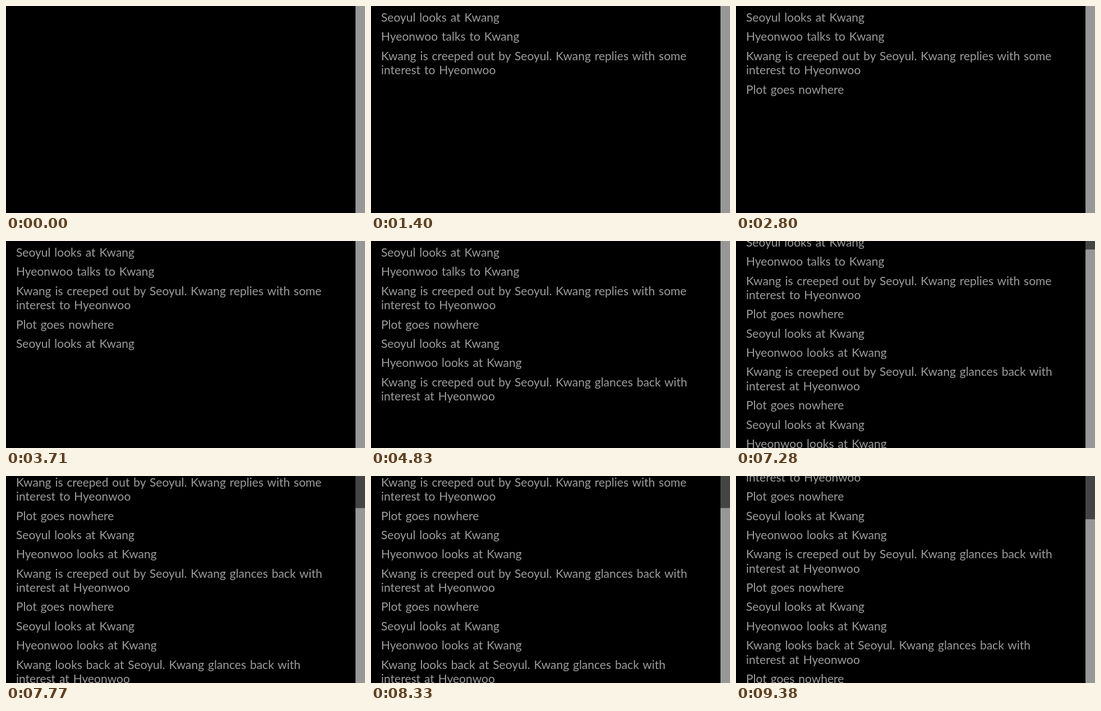
An HTML page that plays this animation: 640 by 370 pixels, repeating every 9660 ms.

```html
<!DOCTYPE html>
<html lang="en">
<head>
<meta charset="utf-8">
<style>
  html, body { margin: 0; width: 100%; height: 100%; overflow: hidden; background: #000; }
  svg { display: block; width: 640px; height: 370px; }
  text { font: 21px Lato, "Open Sans", sans-serif; word-spacing: 1.5px; fill: #9c9c9c; }
</style>
</head>
<body>
<svg viewBox="0 0 640 370">
  <rect width="640" height="370"/>
  <g id="page"></g>
  <rect x="623" width="17" height="370" fill="#444"/>
  <rect id="thumb" x="623" width="17" height="370" fill="#979797"/>
</svg>
<script>
const LOOP = 9660, VIEW = 370, ROW = 34.4, WRAP = 25.3, PAD = 55;
const [A, B, C] = ["Seoyul", "Kwang", "Hyeonwoo"];
const glance = `${A} looks at ${B}`;
const nowhere = "Plot goes nowhere";
const script = [
  [350, glance],
  [840, `${C} talks to ${B}`],
  [1400, `${B} is creeped out by ${A}. ${B} replies with some`, `interest to ${C}`],
  [2800, nowhere],
  [3710, glance],
  [4410, `${C} looks at ${B}`],
  [4830, `${B} is creeped out by ${A}. ${B} glances back with`, `interest at ${C}`],
  [5810, nowhere],
  [6720, glance],
  [7280, `${C} looks at ${B}`],
  [7770, `${B} looks back at ${A}. ${B} glances back with`, `interest at ${C}`],
  [8820, nowhere]
];

const page = document.getElementById("page");
const thumb = document.getElementById("thumb");

function addLine(text, y) {
  const el = document.createElementNS("http://www.w3.org/2000/svg", "text");
  el.setAttribute("x", 18);
  el.setAttribute("y", y);
  el.textContent = text;
  page.append(el);
  return el;
}

let y = 28;
const entries = script.map(([time, ...lines]) => {
  const els = lines.map((line, i) => addLine(line, y + i * WRAP));
  const bottom = y + (lines.length - 1) * WRAP;
  y = bottom + ROW;
  return { time, els, bottom };
});

function draw(now) {
  const t = now % LOOP;
  let bottom = 0;
  for (const e of entries) {
    const shown = t >= e.time;
    for (const el of e.els) el.setAttribute("visibility", shown ? "visible" : "hidden");
    if (shown) bottom = e.bottom;
  }
  // The view follows the last baseline once it leaves the window.
  const scroll = Math.max(0, bottom - VIEW);
  page.setAttribute("transform", `translate(0 ${-scroll})`);
  thumb.setAttribute("y", VIEW * scroll / (bottom + PAD));
}

const start = performance.now();
function tick() {
  draw(performance.now() - start);
  requestAnimationFrame(tick);
}
tick();
</script>
</body>
</html>
```
